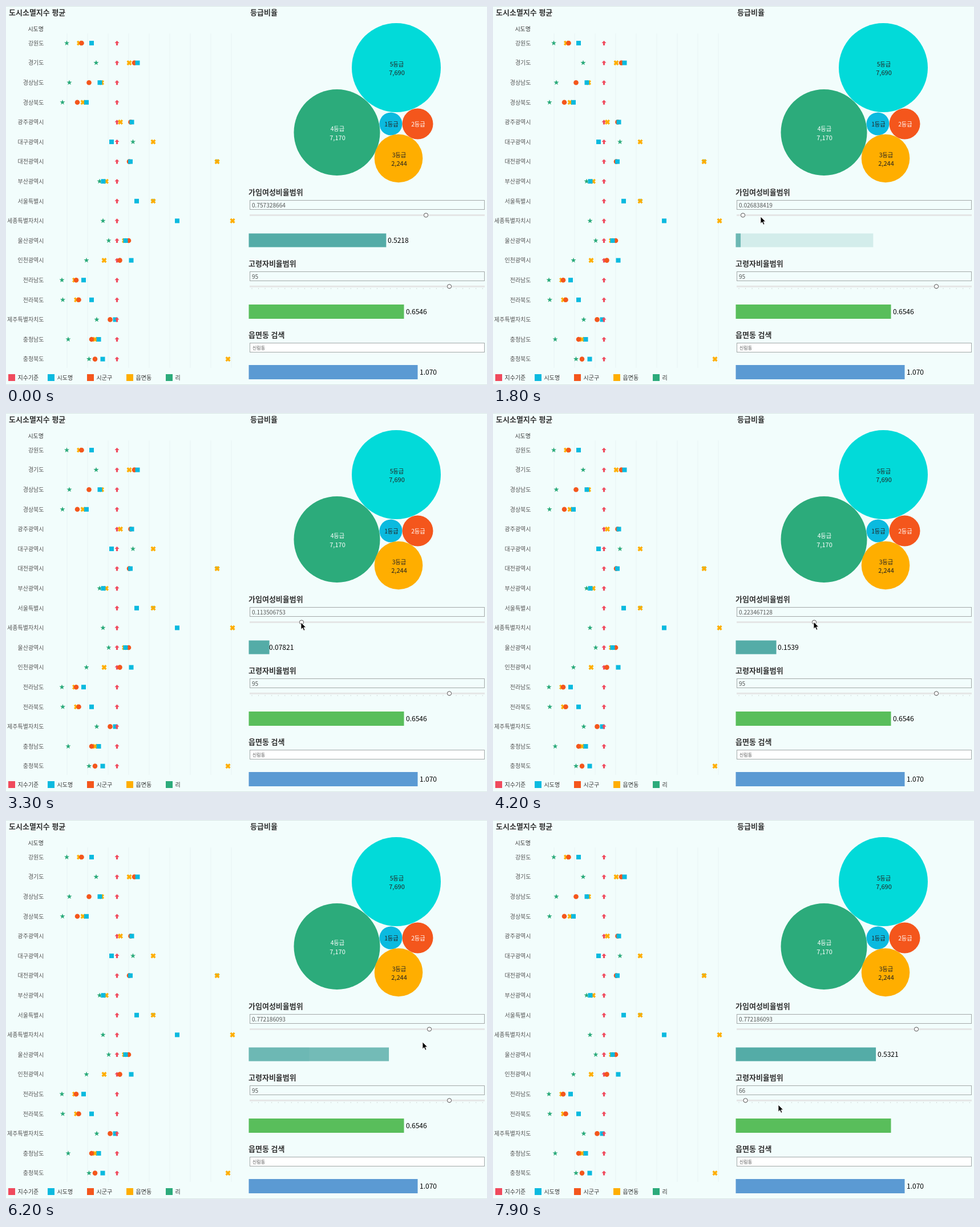
Recreate the animation shown at these times as an HTML page. Size 843 by 664 pixels, loop 8 s.

```html
<!DOCTYPE html>
<html lang="ko">
<head>
<meta charset="utf-8">
<style>
html, body { margin: 0; width: 100%; height: 100%; overflow: hidden; background: #f2fdfc; }
svg { display: block; position: absolute; left: 0; top: 0; }
text { font-family: "Noto Sans CJK KR", "Noto Sans KR", "Noto Sans CJK JP", "Noto Sans CJK", "Noto Sans", sans-serif; }
</style>
</head>
<body>
<svg id="stage" width="843" height="664" viewBox="0 0 843 664"></svg>
<script>
const LOOP = 8000, STEP = 100;
const RED = '#f04a5d', BLUE = '#0bbadf', ORANGE = '#f4561c', YELLOW = '#ffae00', GREEN = '#2cab7b', TEAL = '#54aca7';
const stage = document.getElementById('stage');

function add(tag, attrs, content) {
  const el = document.createElementNS('http://www.w3.org/2000/svg', tag);
  for (const k in attrs) el.setAttribute(k, attrs[k]);
  if (content !== undefined) el.textContent = content;
  return stage.appendChild(el);
}
// y is the vertical middle of the line
function label(x, y, size, str, opts = {}) {
  return add('text', { x, y: y + size * 0.37, 'font-size': size, fill: '#555', ...opts }, str);
}
const rect = (x, y, width, height, fill, opts = {}) => add('rect', { x, y, width, height, fill, ...opts });
const disc = (cx, cy, r, fill, opts = {}) => add('circle', { cx, cy, r, fill, ...opts });
const title = (x, y, str) => label(x, y, 13, str, { 'font-weight': 700, fill: '#333' });
const value = (x, y, str) => label(x, y, 12, str, { 'font-weight': 500, fill: '#000' });

// Frame lines and grid
rect(0, 0, 843, 1, '#d9e5e4');
rect(0, 663, 843, 1, '#d9e5e4');
for (let i = 0; i < 9; i++) rect(106.5 + i * 36, 48, 1, 586, '#e8f4f3');

// Dot plot
title(5, 11, '도시소멸지수 평균');
label(66, 40, 10, '시도명', { 'text-anchor': 'end', 'font-weight': 500, fill: '#333' });

const star = Array.from({ length: 10 }, (_, i) => {
  const a = i * Math.PI / 5, r = i % 2 ? 2 : 4.8;
  return (r * Math.sin(a)).toFixed(2) + ',' + (-r * Math.cos(a)).toFixed(2);
}).join(' ');
const place = (x, y, turn = 0) => `translate(${x} ${y}) rotate(${turn})`;
const marks = {
  g: (x, y) => add('polygon', { points: star, fill: GREEN, transform: place(x, y) }),
  x: (x, y) => add('path', { d: 'M-4.7 0H4.7M0 -4.7V4.7', stroke: YELLOW, 'stroke-width': 3.4, transform: place(x, y, 45) }),
  c: (x, y) => disc(x, y, 4.3, ORANGE),
  b: (x, y) => rect(x - 4, y - 4, 8, 8, BLUE),
  r: (x, y) => add('path', { d: 'M0 -4.2L4 0H1.6V4H-1.6V0H-4Z', fill: RED, transform: place(x, y) })
};
// Each row lists its marks from back to front
const rows = [
  ['강원도', 'g106.5 x128.5 c132.5 b150 r194.5'],
  ['경기도', 'g158 r194.5 x216 c225 b230.5'],
  ['경상남도', 'g111 c145.5 x167.5 b164.5 r194.5'],
  ['경상북도', 'g99 c125 x135 b141 r194.5'],
  ['광주광역시', 'r194.5 x200.5 c218.5 b220.5'],
  ['대구광역시', 'b185 r194.5 g222.5 x258'],
  ['대전광역시', 'r194.5 c216 b218 g370 x370'],
  ['부산광역시', 'g164 x175.5 b170.5 r194.5'],
  ['서울특별시', 'r194.5 b229 g258 x258'],
  ['세종특별자치시', 'g170 r194.5 b300 x397'],
  ['울산광역시', 'g180 r194.5 x207.5 c215 b209.5'],
  ['인천광역시', 'g141 x172 r194.5 c199.5 b219.5'],
  ['전라남도', 'g98 x120.5 c123 b136 r194.5'],
  ['전라북도', 'g99.5 x123.5 c127.5 b150 r194.5'],
  ['제주특별자치도', 'g159 c182.5 b191.5 r194.5'],
  ['충청남도', 'g109 x156 c150 b162.5 r194.5'],
  ['충청북도', 'g145.5 c156 b169.5 r194.5 x389']
];
rows.forEach(([name, list], i) => {
  const y = 65 + i * 34.6;
  label(66.5, y, 10, name, { 'text-anchor': 'end' });
  for (const m of list.split(' ')) marks[m[0]](+m.slice(1), y);
});
[['지수기준', RED], ['시도명', BLUE], ['시군구', ORANGE], ['읍면동', YELLOW], ['리', GREEN]].forEach(([name, color], i) => {
  rect(4 + i * 69, 645, 12, 12, color);
  label(20.5 + i * 69, 651, 10, name, { fill: '#333' });
});

// Bubbles
title(428, 11, '등급비율');
[
  [684, 108, 78, '#02dad9', '#222', '5등급', '7,690'],
  [580, 221.5, 75.5, GREEN, '#fff', '4등급', '7,170'],
  [674.5, 206.5, 20, BLUE, '#222', '1등급'],
  [721.5, 206.5, 27, ORANGE, '#fff', '2등급'],
  [688, 267, 42.3, YELLOW, '#222', '3등급', '2,244']
].forEach(([x, y, r, color, ink, name, count]) => {
  const opts = { 'text-anchor': 'middle', fill: ink };
  disc(x, y, r, color);
  label(x + 1, count ? y - 6 : y + 0.5, 10.3, name, opts);
  if (count) label(x + 1, y + 9, 11, count, opts);
});

// Parameter panels
function field(y, size, str, fill) {
  rect(427.5, y - 8, 411, 16, fill, { stroke: '#a3a8a8' });
  return label(431, y + 0.5, size, str);
}
function slider(y, x) {
  rect(427, y - 1.5, 412, 3, '#e5e6e6');
  return disc(x, y, 3.6, '#fff', { stroke: '#555', 'stroke-width': 1 });
}
title(425, 326, '가임여성비율범위');
const ratioText = field(348.5, 10.1, '', '#f2fdfc');
const ratioKnob = slider(366.5, 736);
const oldBar = rect(425.5, 398.5, 0, 24, TEAL);
const newBar = rect(425.5, 398.5, 0, 24, TEAL);
const ratioValue = value(0, 410.5, '');

title(425, 451, '고령자비율범위');
const ageText = field(473.5, 10.1, '95', '#f2fdfc');
for (let i = 0; i < 36; i++) rect(430.5 + i * 11.55, 494, 1, 2, '#d3d9d8');
const ageKnob = slider(491.3, 777);
rect(425.5, 523, 272, 25, '#59be5b');
const ageValue = value(701, 535.5, '0.6546');

title(425, 576.5, '읍면동 검색');
field(598.5, 8, '신림동', '#fff').setAttribute('x', 432);
rect(425.5, 629, 296, 25, '#5b9ad3');
value(725, 641.5, '1.070');

const cursor = add('path', {
  d: 'M0 0V12.2L2.8 9.6L4.9 14.2L6.9 13.3L4.9 8.8H8.7Z',
  fill: '#000', stroke: '#fff', 'stroke-width': 0.8
});

// Time, input text, bar value, label position
const ratios = [
  [-1000, '0.757328664', '0.5218', 669],
  [1500, '0.026838419', '0.01849', 436],
  [2400, '0.113506753', '0.07821', 461],
  [3600, '0.223467128', '0.1539', 499],
  [4500, '0.332901451', '0.2294', 534],
  [5900, '0.772186093', '0.5321', 674]
];
const knobStops = [[0, 736], [1200, 438], [2400, 473], [3300, 518], [4200, 563], [5600, 742]];
const path = [
  [100, 600, 655], [500, 510, 480], [900, 438, 371], [1000, 438, 371], [1200, 438, 367],
  [1500, 438, 367], [1800, 469, 369], [2000, 470, 369], [2200, 470, 367], [2600, 470, 367],
  [3100, 517, 367], [3600, 517, 367], [4200, 562, 366], [4500, 562, 366], [5000, 677, 364],
  [5300, 718, 366], [5700, 741, 366], [5900, 741, 366], [6200, 730, 389], [6400, 700, 490],
  [6600, 665, 548], [6700, 640, 534], [7400, 442, 491], [7700, 442, 491], [7900, 500, 499]
];
const fade = [0, 0, 0.35, 0.8, 0.95, 1];
const lastIndex = (list, t) => list.reduce((n, item, i) => item[0] <= t ? i : n, 0);
const show = (el, on) => el.setAttribute('visibility', on ? 'visible' : 'hidden');

function along(t) {
  const i = lastIndex(path, t), a = path[i], b = path[i + 1] || a;
  const k = a === b ? 0 : (t - a[0]) / (b[0] - a[0]);
  return [a[1] + (b[1] - a[1]) * k, a[2] + (b[2] - a[2]) * k];
}
function setBar(bar, amount, opacity) {
  bar.setAttribute('width', amount * 461.5);
  bar.setAttribute('opacity', opacity);
}
function draw(t) {
  const i = lastIndex(ratios, t);
  const [start, input, amount, x] = ratios[i];
  const p = fade[Math.min(5, Math.floor((t - start) / STEP))];
  ratioText.textContent = input;
  setBar(oldBar, ratios[Math.max(0, i - 1)][2], 1 - p);
  setBar(newBar, amount, p);
  ratioValue.textContent = amount;
  ratioValue.setAttribute('x', x);
  show(ratioValue, p === 1);

  ratioKnob.setAttribute('cx', knobStops[lastIndex(knobStops, t)][1]);
  ageKnob.setAttribute('cx', t < 7600 ? 777 : 442.5);
  ageText.textContent = t < 7800 ? '95' : '66';
  show(ageValue, t < 7800);

  show(cursor, t >= 100);
  cursor.setAttribute('transform', place(...along(t)));
}
const begin = performance.now();
function tick() {
  const t = (performance.now() - begin) % LOOP;
  draw(Math.floor(t / STEP) * STEP);
  requestAnimationFrame(tick);
}
tick();
</script>
</body>
</html>
```
